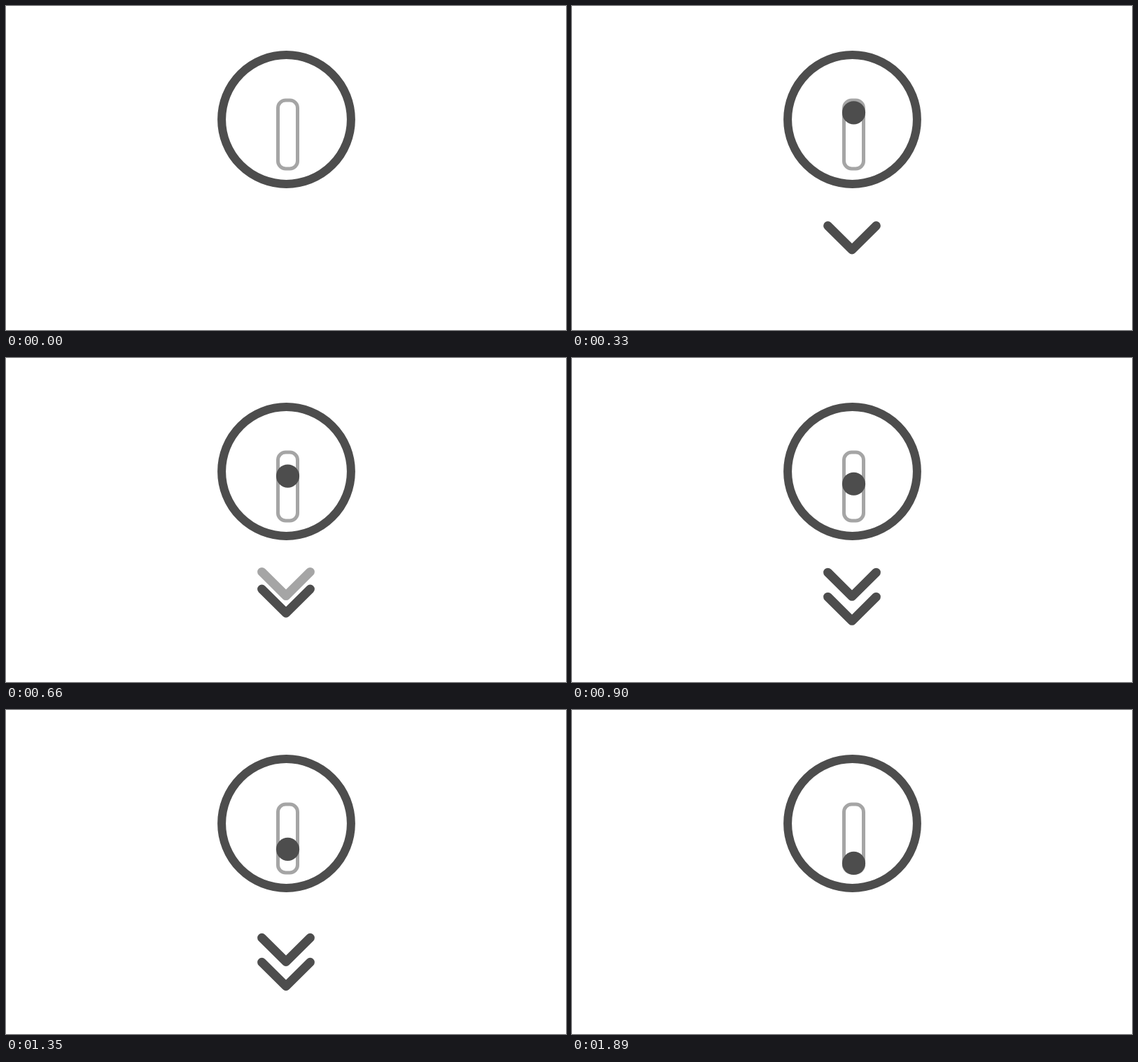
An HTML page with a canvas for the animation above (1.92 s loop, 800 by 464 pixels).

```html
<!DOCTYPE html>
<html lang="en">
<head>
<meta charset="utf-8">
<title>Scroll hint</title>
<style>
html, body { margin: 0; width: 100%; height: 100%; overflow: hidden; background: #fff; }
canvas { display: block; }
</style>
</head>
<body>
<canvas id="stage" width="800" height="464"></canvas>
<script>
const ctx = document.getElementById("stage").getContext("2d");
const LOOP = 1920, STEP = 30, FADE = 270;
const DARK = "#4d4d4d", PALE = "#a5a5a5";

const clamp = v => Math.min(1, Math.max(0, v));
const fade = (t, start) => clamp((t - start) / FADE);

// Holds during the first fade, then glides down with a slight slowdown.
function dotY(t) {
  const u = clamp((t - FADE) / 1620);
  return 149.7 + 84.1 * u - 14.4 * u * u;
}

function stroke(color, width) {
  ctx.strokeStyle = color;
  ctx.lineWidth = width;
  ctx.stroke();
}

function ring() {
  ctx.beginPath();
  ctx.arc(400.5, 162.5, 92.4, 0, Math.PI * 2);
  stroke(DARK, 12);
}

function slot() {
  ctx.beginPath();
  ctx.roundRect(388.5, 135, 28, 98, 11);
  stroke(PALE, 5);
}

function dot(y, alpha) {
  ctx.globalAlpha = alpha;
  ctx.fillStyle = DARK;
  ctx.beginPath();
  ctx.arc(402.5, y, 16.6, 0, Math.PI * 2);
  ctx.fill();
}

function chevron(y, alpha) {
  ctx.globalAlpha = alpha;
  ctx.lineCap = ctx.lineJoin = "round";
  ctx.beginPath();
  ctx.moveTo(365.5, y - 34.3);
  ctx.lineTo(400, y);
  ctx.lineTo(434.5, y - 34.3);
  stroke(DARK, 12.8);
}

function draw(t) {
  const y = dotY(t);
  ctx.globalAlpha = 1;
  ctx.fillStyle = "#fff";
  ctx.fillRect(0, 0, 800, 464);
  ring();
  slot();
  dot(y, fade(t, 0));
  chevron(y + 196.2, fade(t, 0) * (1 - fade(t, 1620)));
  chevron(Math.max(340.6, y + 161.2), fade(t, 525) * (1 - fade(t, 1350)));
}

const begin = performance.now();
function tick() {
  const t = (performance.now() - begin) % LOOP;
  draw(Math.floor(t / STEP) * STEP);
  requestAnimationFrame(tick);
}
tick();
</script>
</body>
</html>
```
